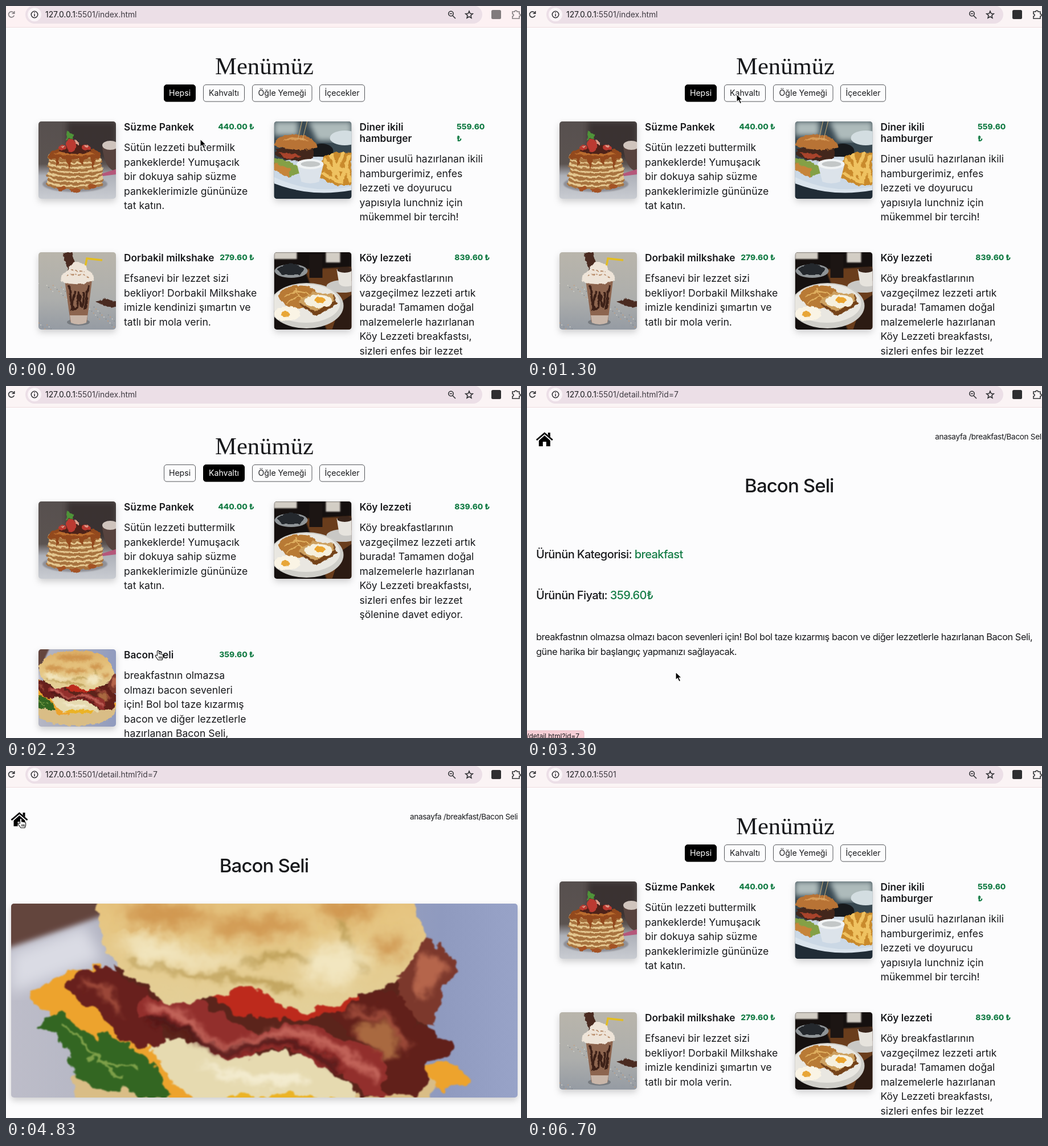
Write an HTML page that moves like this. It is 904 px wide and 619 px high and loops after 6730 ms.

```html
<!DOCTYPE html>
<html lang="tr">
<head>
<meta charset="utf-8">
<title>Menü</title>
<style>
html, body { margin: 0; width: 100%; height: 100%; overflow: hidden; background: #fcfcfd; }
svg { display: block; }
text { font-family: Inter, Roboto, sans-serif; fill: #18191c; white-space: pre; }
.desc { font-size: 17.6px; }
.name { font-size: 17.3px; font-weight: 600; }
.price { font-size: 13.8px; font-weight: 800; }
.tab { font-size: 14.1px; text-anchor: middle; }
.green { fill: #167d47; }
.shadow { filter: drop-shadow(0 5px 6px rgba(0, 0, 0, .18)); }
.info { font-size: 20px; font-weight: 500; letter-spacing: -.6px; }
.para { font-size: 16.4px; letter-spacing: -.47px; }
.line { fill: none; stroke: #333437; stroke-width: 1.6; }
</style>
</head>
<body>
<svg id="stage" width="904" height="619" viewBox="0 0 904 619">
  <defs>
    <filter id="soft"><feGaussianBlur stdDeviation="1"/></filter>
    <filter id="softer"><feGaussianBlur stdDeviation="5"/></filter>
    <filter id="hazy"><feGaussianBlur stdDeviation="12"/></filter>
    <filter id="rough" color-interpolation-filters="sRGB">
      <feTurbulence type="fractalNoise" baseFrequency=".12" numOctaves="2" seed="4"/>
      <feDisplacementMap in="SourceGraphic" scale="6" xChannelSelector="R" yChannelSelector="G"/>
      <feGaussianBlur stdDeviation=".4"/>
    </filter>
    <filter id="crumbly" color-interpolation-filters="sRGB">
      <feTurbulence type="fractalNoise" baseFrequency=".035" numOctaves="3" seed="7"/>
      <feDisplacementMap in="SourceGraphic" scale="30" xChannelSelector="R" yChannelSelector="G"/>
      <feGaussianBlur stdDeviation=".8"/>
    </filter>
    <linearGradient id="plate"><stop stop-color="#bdbdc9"/><stop offset=".5" stop-color="#a5a9bb"/><stop offset=".85" stop-color="#8f9abf"/><stop offset="1" stop-color="#98a3c8"/></linearGradient>
    <linearGradient id="bun" x2="0" y2="1"><stop stop-color="#dcae66"/><stop offset=".45" stop-color="#e6c581"/><stop offset="1" stop-color="#e3d09a"/></linearGradient>
    <linearGradient id="room" x2="0" y2="1"><stop stop-color="#57504f"/><stop offset=".55" stop-color="#5b5350"/><stop offset=".7" stop-color="#aeb1b9"/><stop offset="1" stop-color="#c9ccd2"/></linearGradient>
    <linearGradient id="stone" x2="0" y2="1"><stop stop-color="#b9b5ab"/><stop offset=".6" stop-color="#adaeac"/><stop offset="1" stop-color="#959ba3"/></linearGradient>
    <clipPath id="thumb"><rect width="136" height="136" rx="5"/></clipPath>
    <clipPath id="wide"><rect x="9" y="242" width="889" height="341" rx="5"/></clipPath>

    <symbol id="pancake" viewBox="0 0 136 136">
      <path fill="url(#room)" d="M0 0h136v136H0z"/>
      <path fill="#2d2827" d="M50 0h86v66H50z" opacity=".7" filter="url(#softer)"/>
      <path fill="#57433e" d="M112 45h24v43q-20-4-24-43"/>
      <ellipse cx="126" cy="42" rx="14" ry="8" fill="#cfc4bd"/>
      <path fill="#b5577a" d="M104 94l32-10v9l-30 4z"/>
      <ellipse cx="64" cy="110" rx="57" ry="14" fill="#8f9097" filter="url(#soft)"/>
      <g filter="url(#rough)">
        <g id="stack"></g>
        <path fill="#93491d" d="M18 60q4-14 46-15 42 1 46 14-2 9-10 6l-4 20-5-21-10 3-4 12-5-13-14 1-4 18-5-18-12-2-4 15-5-15q-9 2-10-5"/>
        <path fill="#c87a36" d="M26 57q36-15 74 0-34 7-74 0" opacity=".7"/>
        <path fill="#4d2219" d="M36 52q28-24 58 0-28 10-58 0"/>
        <g fill="#bb3a31"><ellipse cx="57" cy="42" rx="9" ry="11"/><ellipse cx="42" cy="46" rx="6" ry="5"/><ellipse cx="84" cy="46" rx="8" ry="5"/></g>
        <path fill="#e0a08c" d="M64 32q9 2 8 9l-7-2zM78 43l10-2-4 5zM39 43l6-1-2 4z"/>
        <path fill="#4f9339" d="M50 16l6 5 6 2-1 8-7-1-6 4z"/>
        <g fill="#a45325"><ellipse cx="40" cy="118" rx="8" ry="4"/><ellipse cx="64" cy="121" rx="9" ry="4"/><ellipse cx="94" cy="114" rx="8" ry="4"/></g>
      </g>
    </symbol>

    <symbol id="burger" viewBox="0 0 136 136">
      <path fill="#384851" d="M0 0h136v136H0z"/>
      <path fill="#aebbbb" d="M0 0h42v25H0zM60 0h76v34H76z" filter="url(#softer)"/>
      <ellipse cx="124" cy="29" rx="26" ry="13" fill="#d3dde1"/>
      <ellipse cx="84" cy="52" rx="20" ry="13" fill="#17191c"/>
      <ellipse cx="78" cy="92" rx="90" ry="30" fill="#cbd8e5"/>
      <path fill="#202c36" d="M0 106q50 20 136 15v15H0z"/>
      <path fill="#d9e3ec" d="M0 98q70 32 136 16v7q-72 13-136-12z"/>
      <g filter="url(#rough)">
        <path fill="#84a046" d="M0 63q40 10 52 24l-24 11Q8 91 0 82z"/>
        <path fill="#c6843a" d="M0 72l30 12-5 14L0 86z"/>
        <path fill="#43271c" d="M2 47h68l-1 17q-36 13-66-6z"/>
        <path fill="#a8432b" d="M6 55l32 2 10 6-22 3z"/>
        <path fill="#b87335" d="M0 42q2-18 36-19 38 1 40 23-36 10-76-4z"/>
        <path fill="#d79b58" d="M16 34q20-14 45 1-20-5-45-1"/>
        <path fill="#c98a2c" d="M78 98l8-36 24-8 26 1v56l-26 2z"/>
        <path stroke="#efc261" stroke-width="6" stroke-linecap="round" d="M89 68l20 24M101 60l15 43M121 56l-18 43M132 61l-14 46M86 92l30 15M96 82l33 3M126 75l8 30"/>
      </g>
      <path stroke="#cdb078" fill="none" d="M42 31l7-31M50 32l8-32"/>
      <path fill="#dce3ea" d="M40 75h47l-8 31q-15 6-31 0z"/>
      <ellipse cx="63.5" cy="75" rx="23.5" ry="9" fill="#f0f3f4"/>
      <ellipse cx="64" cy="75" rx="17" ry="5" fill="#c3c7c7"/>
    </symbol>

    <symbol id="shake" viewBox="0 0 136 136">
      <path fill="url(#stone)" d="M0 0h136v136H0z"/>
      <g id="specks"></g>
      <path fill="none" stroke="#e3bd22" stroke-width="3.5" d="M80 36l5-25 27 3"/>
      <ellipse cx="70" cy="123" rx="20" ry="6" fill="#777b80"/>
      <path fill="#8d654f" d="M46 49h48l-9 73q-16 8-29 0z"/>
      <path fill="#c9b6a9" d="M55 111h31l-2 13q-14 6-27 0z"/>
      <g filter="url(#rough)">
        <path fill="#4a2b21" d="M42 2l17-3 7 28-14 6zM101 86l16-5 19 6v10l-22-2z"/>
        <path fill="none" stroke="#3d2118" stroke-width="4" d="M54 58l5 45M64 68q-10 40 4 30l3-28q7 50 9 0M87 58l-5 42"/>
        <path fill="#eee4d8" d="M41 52q-6-14 12-20 2-14 16-15 16 2 17 15 15 6 10 19-28 8-55 1"/>
        <path fill="none" stroke="#b68a67" stroke-width="2" d="M50 42q18-8 40 3M58 31l22 3" stroke-dasharray="4 3"/>
      </g>
    </symbol>

    <symbol id="village" viewBox="0 0 136 136">
      <path fill="#15100f" d="M0 0h136v136H0z"/>
      <path fill="#6b3c1d" d="M54 30l82-4v110H92z" filter="url(#soft)"/>
      <path fill="#d3cec5" d="M0 0h40v12H0zM91 0h25v18H91z" filter="url(#soft)"/>
      <ellipse cx="30" cy="33" rx="29" ry="12" fill="#8f9497"/>
      <g fill="#24282d" filter="url(#rough)"><path d="M6 30q22-22 47 1l-9 9H14z"/></g>
      <path fill="#1c1513" d="M62 4h23v41H62z"/>
      <ellipse cx="121" cy="60" rx="29" ry="11" fill="#c9c8c5"/>
      <path fill="#e6e3dd" d="M110 30h26v29q-17 4-22-4z"/>
      <ellipse cx="124" cy="31" rx="13" ry="5" fill="#39251b"/>
      <path fill="#2c1b13" d="M118 87l18-12v61h-34z"/>
      <ellipse cx="57" cy="94" rx="65" ry="40" fill="#cfcec9"/>
      <ellipse cx="56" cy="90" rx="60" ry="34" fill="#e9e7e1"/>
      <g filter="url(#rough)">
        <path fill="#b87a35" d="M8 76q6-16 30-17 28-3 38 12-6 20-28 28-30 2-40-23"/>
        <path fill="none" stroke="#e1b262" stroke-width="2" d="M18 78l22-10 22 5M21 90l20-12 21 7M38 65l14 28"/>
        <path fill="#754319" d="M43 90l24-18 38 2 5 17-36 22z"/>
        <path fill="#cda161" d="M42 87l25-17 37 4 2 11-34 20z"/>
        <ellipse cx="78" cy="86" rx="25" ry="11" fill="#f6f0de"/>
        <ellipse cx="81" cy="84" rx="9" ry="5" fill="#eba52f"/>
        <ellipse cx="23" cy="108" rx="23" ry="13" fill="#faf4e5"/>
        <ellipse cx="20" cy="109" rx="8" ry="5" fill="#e8a637"/>
      </g>
    </symbol>

    <symbol id="bacon" viewBox="9 116 890 593" preserveAspectRatio="xMidYMid slice">
      <path fill="url(#plate)" d="M9 116h890v593H9z"/>
      <path fill="#dadbe4" d="M9 330l130-50 30 60-160 60z" filter="url(#hazy)"/>
      <path fill="#63453d" d="M-20 90h270L172 262-20 328z" filter="url(#softer)"/>
      <g filter="url(#crumbly)">
        <path fill="#d9bd86" d="M118 540q300-60 630 10 10 90-120 130-230 50-400-10-110-40-110-130"/>
        <path fill="#5b241b" d="M190 350q250 40 510 10l40 100-60 123q-200-10-420-90z"/>
        <path fill="#eda32d" d="M40 397q50-30 130-45l95 140 130 91v30l-85 5q-40-45-75-88-70-50-130-78-50-25-65-55M735 540q40-30 60-16 10 18 16 32-30 22-60 14z"/>
        <path fill="#336622" d="M58 462q10-32 45-30 15 30 60 42 70 15 105 60 15 22 20 50-30 10-60-10-40 0-80-10-40-20-34-56-12-32-56-46"/>
        <path fill="none" stroke="#7d9f48" stroke-width="5" d="M92 453l43 36 70 66M142 513l90 20"/>
        <path fill="#e6dab0" d="M254 494q40-32 110 8 60 15 120 0 70 15 115 55l20 40-270 4q-70-50-95-107"/>
        <path fill="#f3ebcf" d="M330 520q80 30 190 20l10 18q-120 20-200-38" filter="url(#softer)"/>
        <ellipse cx="470" cy="592" rx="110" ry="16" fill="#ebb326"/>
        <path fill="#7c382c" d="M680 372q30-30 50-74 30 10 57 36 0 40-26 72-10 20-6 46-40 10-55-30z"/>
        <path fill="#b5654c" d="M722 330q30 0 50 16-10 40-50 66z" filter="url(#softer)"/>
        <path fill="#68201d" d="M112 388q10-32 38-30 50-4 84 30 40 30 46 100-46 14-86-8-12-40-40-60-30-2-42-32"/>
        <path fill="#922f2c" d="M228 440q10-38 52-32 60-4 110 36 40 34 70 18 60-20 116 6 60 34 118 52 10 40-12 62-70 6-92-44-56-12-76-32-50-14-84 6-60 14-100-40-20-22-102-32"/>
        <path fill="#61201a" d="M568 440q50-48 100-46 40 10 52 62 40 10 62 34 0 24-38 32-4 40-26 62-40 4-60-14 40-54-28-82-40-20-62-48"/>
        <path fill="none" stroke="#c4665c" stroke-width="16" d="M250 425q65 0 90 46 50 45 104 8 75-30 145 27l70 44" filter="url(#softer)"/>
        <path fill="none" stroke="#4f1716" stroke-width="12" d="M250 448q60 0 88 36 55 38 118 0 70 0 128 50" filter="url(#softer)"/>
        <path fill="none" stroke="#a5503c" stroke-width="12" d="M135 382q50 8 60 50M600 432l60 6 50 60M620 470l60 40" filter="url(#softer)"/>
        <path fill="#a9693f" d="M612 460q40-30 70 10 20 30 0 44-50-10-70-54" filter="url(#softer)"/>
        <path fill="#bd2a1c" d="M358 408q130-50 256 0-14 34-120 38-100-2-136-38"/>
        <path fill="url(#bun)" d="M165 300Q150 230 210 180 300 122 450 126 620 125 690 195 735 250 730 300 705 375 650 392 590 415 560 424 515 440 480 418 440 380 400 394 340 420 290 416 230 385 205 355 175 335 165 300"/>
        <g fill="#c9883f" opacity=".75" filter="url(#hazy)"><ellipse cx="280" cy="262" rx="75" ry="24"/><ellipse cx="440" cy="282" rx="90" ry="20"/><ellipse cx="600" cy="250" rx="50" ry="24"/><ellipse cx="675" cy="318" rx="28" ry="20"/><ellipse cx="440" cy="180" rx="140" ry="25"/></g>
        <path fill="none" stroke="#b8994f" stroke-width="10" d="M215 340q90 28 168 31 72 3 130 30M410 345q90-20 135-3M590 270q10 60 40 90" filter="url(#softer)"/>
        <path fill="#f2e6c0" d="M190 300q70-10 145 30l110 9-70 16-130-10zM520 330l80-25 40 35-50 50-65-15z" filter="url(#hazy)"/>
      </g>
    </symbol>

    <symbol id="home" viewBox="0 0 30 26" overflow="visible">
      <path d="M21 1h4v8l-4-4zM5 15L15 6l10 9v10h-7v-8h-6v8H5z"/>
      <path fill="none" stroke="#000" stroke-width="2.8" d="M1 14L15 2l14 12"/>
    </symbol>
  </defs>

  <path fill="#fcfcfd" d="M0 0h904v619H0z"/>
  <g id="page"></g>

  <g id="bubble">
    <rect id="bubbleBox" x="-9" y="606" height="20" rx="4" fill="#f6ced5" stroke="#e9bfc7"/>
    <text id="bubbleText" y="620" font-size="11.8" text-anchor="end"></text>
  </g>

  <path id="bar" d="M0 0h904v37.5H0z"/>
  <path stroke="#efdcdf" d="M0 37.5h904"/>
  <rect x="34" y="-1" width="802" height="32" rx="16" fill="#ecdfe7"/>
  <circle cx="50" cy="15" r="12" fill="#fcf5f8"/>
  <circle cx="50" cy="15" r="5.7" class="line"/>
  <path class="line" d="M50 14v4.3M50 11v1.6"/>
  <text x="69" y="20" font-size="13.9">127.0.0.1<tspan id="url" fill="#3f3b42"></tspan></text>
  <g class="line"><circle cx="781" cy="13.5" r="4.2"/><path d="M784 17l5 5M779 13.5h4M813 9l1.8 4.2 4.5.4-3.4 3 1 4.4-3.9-2.3-3.9 2.3 1-4.4-3.4-3 4.5-.4z"/></g>
  <g id="idle">
    <path class="line" d="M14 12.5a5 5 0 1 0 .3 4M14.7 9v4.2h-4.2"/>
    <rect x="852" y="7" width="17" height="16" rx="2.5" fill="#2e2e30"/>
    <path class="line" d="M889 10h4a2 2 0 0 1 4 0h4v4a2 2 0 0 1 0 4v4h-12v-4a2 2 0 0 0 0-4z"/>
  </g>

  <g id="cursor">
    <path id="arrow" fill="#000" stroke="#fff" stroke-width="1.1" d="M0 0v14l3.3-3 2.6 5.7 2.7-1.2L6 10h4.4z"/>
    <path id="hand" fill="#fff" stroke="#111" stroke-width="1.1" stroke-linejoin="round" d="M-1.5 9V1.2q1.5-2 3 0V6q1.6-1 2.6.4 1.6-.8 2.5.6 2-.4 2 1.6v3.6l-1.6 4.6H0l-4.8-6.7q-.5-2 1.4-1.8zM1.8 10.5v4M4 10.5v4M6 10.5v4"/>
  </g>
</svg>
<script>
const LOOP = 6730;
const $ = id => document.getElementById(id);
const text = (x, y, cls, s, more = '') => `<text x="${x}" y="${y}" class="${cls}" ${more}>${s}</text>`;

// Small repeated parts of the pictures
for (let i = 0; i < 7; i++) {
  const x = 63 + i % 2 * 2, y = 110 - i * 8, rx = 50 - i * .6;
  $('stack').innerHTML += `<ellipse cx="${x}" cy="${y}" rx="${rx}" ry="10" fill="#a8733f"/>
    <ellipse cx="${x}" cy="${y - 3}" rx="${rx - 1}" ry="8" fill="#e3c68f"/>`;
}
for (let i = 0; i < 60; i++) {
  const colour = ['#d7d6cf', '#81888d', '#c99b74'][i % 3];
  $('specks').innerHTML += `<circle cx="${i * 53.7 % 136}" cy="${55 + i * 31.3 % 80}" r=".9" fill="${colour}"/>`;
}

const dishes = {
  pancake: { name: ['Süzme Pankek'], price: '440.00 ₺',
    desc: 'Sütün lezzeti buttermilk|pankeklerde! Yumuşacık|bir dokuya sahip süzme|pankeklerimizle gününüze|tat katın.' },
  burger: { name: ['Diner ikili', 'hamburger'], price: '559.60',
    desc: 'Diner usulü hazırlanan ikili|hamburgerimiz, enfes|lezzeti ve doyurucu|yapısıyla lunchniz için|mükemmel bir tercih!' },
  shake: { name: ['Dorbakil milkshake'], price: '279.60 ₺',
    desc: 'Efsanevi bir lezzet sizi|bekliyor! Dorbakil Milkshake|imizle kendinizi şımartın ve|tatlı bir mola verin.' },
  village: { name: ['Köy lezzeti'], price: '839.60 ₺',
    desc: 'Köy breakfastlarının|vazgeçilmez lezzeti artık|burada! Tamamen doğal|malzemelerle hazırlanan|Köy Lezzeti breakfastsı,|sizleri enfes bir lezzet|şölenine davet ediyor.' },
  bacon: { name: ['Bacon Seli'], price: '359.60 ₺',
    desc: 'breakfastnın olmazsa|olmazı bacon sevenleri|için! Bol bol taze kızarmış|bacon ve diğer lezzetlerle|hazırlanan Bacon Seli,' }
};

function card(id, x, y) {
  const { name, price, desc } = dishes[id], extra = (name.length - 1) * 20.4;
  const cost = extra
    ? text(320.5, 14, 'price green', price) + text(320.5, 34.5, 'price green', '₺')
    : text(379, 14, 'price green', price, 'text-anchor="end"');
  return `<g transform="translate(${x} ${y})">
    <g class="shadow"><g clip-path="url(#thumb)"><use href="#${id}" width="136" height="136"/></g></g>
    ${name.map((s, i) => text(150, 15.5 + i * 20.4, 'name', s)).join('')}${cost}
    ${desc.split('|').map((s, i) => text(150, 52 + extra + i * 25.5, 'desc', s)).join('')}</g>`;
}

function menu(active, rowTwo, ids) {
  const tabs = [['Hepsi', 277.5, 55], ['Kahvaltı', 346.5, 72], ['Öğle Yemeği', 432.5, 104.5], ['İçecekler', 550.5, 79]];
  return text(453.5, 119.5, '', 'Menümüz', 'text-anchor="middle" style="font:42.7px \'Liberation Serif\',serif"') +
    tabs.map(([s, x, w], i) => `<rect x="${x}" y="138.5" width="${w}" height="29.5" rx="4.5"
      fill="${i === active ? '#000' : 'none'}" stroke="${i === active ? '#000' : '#55575b'}"/>` +
      text(x + w / 2, 158, 'tab', s, i === active ? 'style="fill:#fff"' : '')).join('') +
    ids.map((id, i) => card(id, i % 2 ? 470.5 : 57, i < 2 ? 203 : rowTwo)).join('');
}

function detail(loaded) {
  const header = `<g transform="translate(${loaded ? 0 : 7.3})">
    <use href="#home" x="8.5" y="81" width="30" height="26"/>
    ${text(709, 94, '', 'anasayfa /breakfast/Bacon Seli', 'font-size="13.6" letter-spacing="-.35"')}
    ${text(453, 187, '', 'Bacon Seli', 'font-size="33" font-weight="500" letter-spacing="-.9" text-anchor="middle"')}</g>`;
  if (loaded) return header + `<g class="shadow"><g clip-path="url(#wide)">
    <use href="#bacon" x="9" y="242" width="889" height="341"/></g></g>`;
  return header +
    text(16, 303, 'info', 'Ürünün Kategorisi: <tspan class="green">breakfast</tspan>') +
    text(16, 375, 'info', 'Ürünün Fiyatı: <tspan class="green">359.60₺</tspan>') +
    text(16, 447, 'para', 'breakfastnın olmazsa olmazı bacon sevenleri için! Bol bol taze kızarmış bacon ve diğer lezzetlerle hazırlanan Bacon Seli,') +
    text(16, 472.5, 'para', 'güne harika bir başlangıç yapmanızı sağlayacak.');
}

const all = menu(0, 433, ['pancake', 'burger', 'shake', 'village']);
const views = [
  [0, all, ':5501/index.html'],
  [1500, menu(1, 463, ['pancake', 'village', 'bacon']), ':5501/index.html'],
  [2880, detail(false), ':5501/detail.html?id=7'],
  [3450, detail(true), ':5501/detail.html?id=7'],
  [4990, all, ':5501']
];
$('page').innerHTML = views.map(v => `<g>${v[1]}</g>`).join('');
const groups = [...$('page').children];

const path = [
  [0, 341, 234], [150, 341, 234], [1030, 368, 155], [1500, 368, 155], [2200, 267, 465], [2600, 267, 465],
  [3000, 261, 503], [3320, 261, 503], [3830, 247, 236], [4150, 225, 205], [4780, 26, 92], [4990, 26, 92],
  [5260, 324, 246], [5560, 324, 246], [6150, 540, 400], [6620, 640, 640], [LOOP, 640, 640]
];
const handTimes = [[1980, 2880], [4760, 4990], [5160, 6600]];
// start, end, right edge, address
const bubbles = [
  [2330, 3420, 100, '127.0.0.1:5501/detail.html?id=7'],
  [4860, 5400, 10, '127.0.0.1:5501'],
  [5400, 6480, 100, '127.0.0.1:5501/detail.html?id=1']
];
const within = (list, t) => list.find(([a, b]) => t >= a && t < b);
const show = (el, on) => el.setAttribute('visibility', on ? 'visible' : 'hidden');

function cursorAt(t) {
  const i = path.findIndex(p => p[0] > t), [t0, x0, y0] = path[i - 1], [t1, x1, y1] = path[i];
  const u = (t - t0) / (t1 - t0), k = u * u * (3 - 2 * u);
  return [x0 + (x1 - x0) * k, y0 + (y1 - y0) * k];
}

function draw(t) {
  const view = views.findLastIndex(v => v[0] <= t);
  groups.forEach((g, i) => g.style.display = i === view ? '' : 'none');
  $('url').textContent = views[view][2];

  const focused = t >= 350;
  $('idle').setAttribute('opacity', focused ? 1 : .6);
  $('bar').setAttribute('fill', focused ? '#fbf4f5' : '#fdf1f3');

  const status = within(bubbles, t);
  show($('bubble'), status);
  if (status) {
    $('bubbleBox').setAttribute('width', status[2] + 9);
    $('bubbleText').setAttribute('x', status[2] - 8);
    $('bubbleText').textContent = status[3];
  }

  const hand = within(handTimes, t);
  show($('hand'), hand);
  show($('arrow'), !hand);
  $('cursor').setAttribute('transform', `translate(${cursorAt(t)})`);
}

const start = performance.now();
function tick() {
  draw((performance.now() - start) % LOOP);
  requestAnimationFrame(tick);
}
tick();
</script>
</body>
</html>
```
